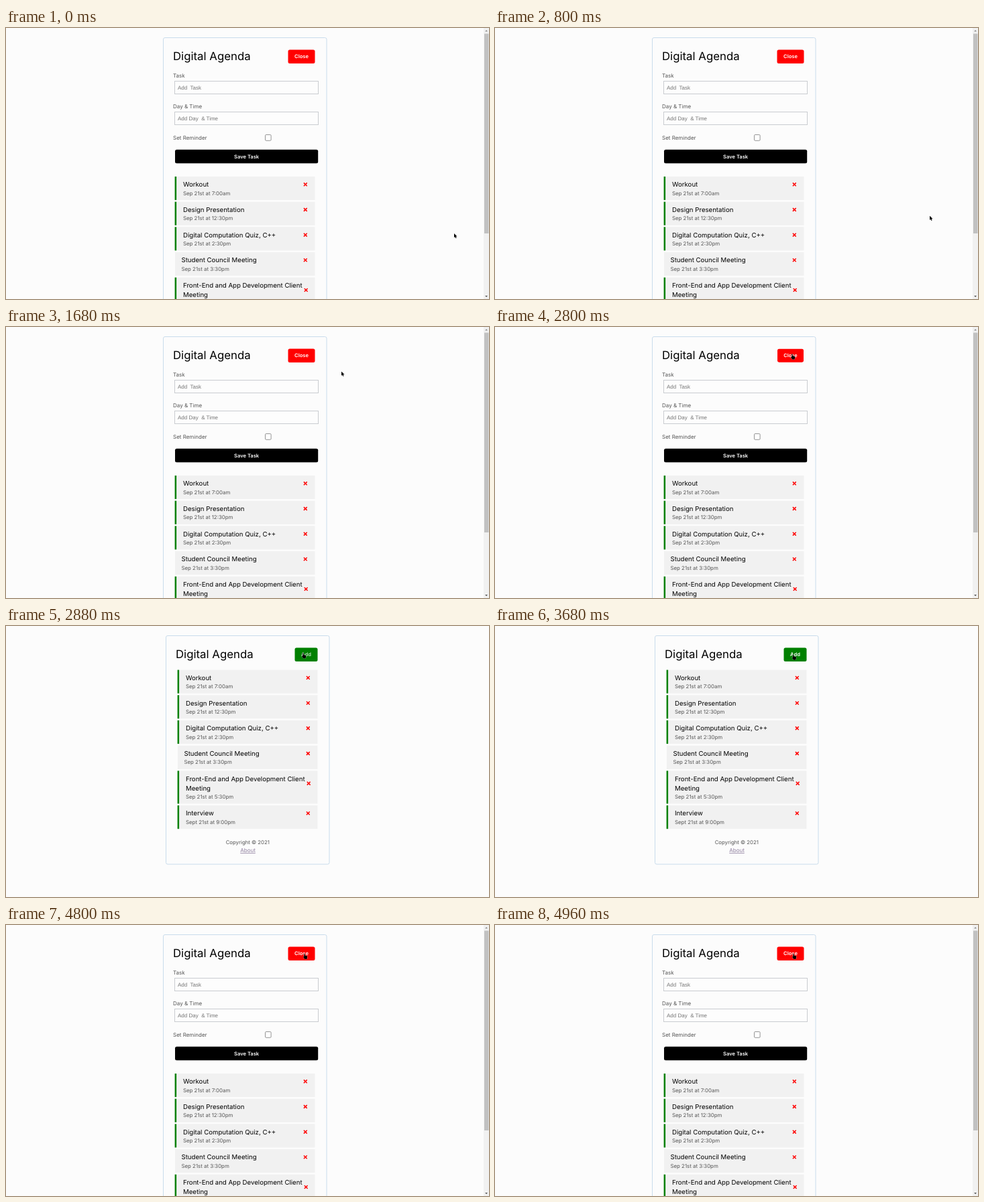
These frames come from a looping animation (720x405 px, 5680 ms). An HTML page:

```html
<!DOCTYPE html>
<html lang="en">
<head>
<meta charset="utf-8">
<style>
  html, body { margin: 0; width: 100%; height: 100%; overflow: hidden; background: #fcfcfc; }
  svg { display: block; width: 720px; height: 405px; }
  text { font: 8px Inter, sans-serif; fill: #555; text-rendering: geometricPrecision; white-space: pre; }
  .title { font-size: 16.8px; fill: #000; }
  .task { font-size: 9.65px; fill: #000; }
  .when { font-size: 7.85px; }
  .hint { font-family: "Liberation Sans", Arial, sans-serif; fill: #757575; }
  .label { font-size: 7.6px; font-weight: 600; fill: #fff; }
  .mid { text-anchor: middle; }
  .foot { font-size: 7.8px; }
  .link { fill: #8f7f9f; text-decoration: underline; }
  .card { fill: none; stroke: #c9dcec; }
  .field { fill: #fdfdfd; stroke: #c9ccd0; }
</style>
</head>
<body>
<svg viewBox="0 0 720 405">
  <g id="form"></g>
  <g id="list"></g>
  <path id="arrow" d="M0 0V6.2L1.4 5L2.4 7.2L3.5 6.7L2.6 4.6H4.5Z" stroke="#fff" stroke-width=".5" paint-order="stroke"/>
  <path id="hand" d="M1.3 .6Q2 -.3 2.6 .6V3L5.6 3.7Q6.4 4 6.2 5L5.6 8.4H2.2L.2 5.4Q0 4.4 1.3 4.8Z" stroke="#fff" stroke-width=".5" paint-order="stroke"/>
</svg>
<script>
const LOOP = 5680, STEP = 40;
const $ = id => document.getElementById(id);

const text = (x, y, cls, str) => `<text x="${x}" y="${y}" class="${cls}">${str}</text>`;
const rect = (x, y, w, h, attrs) => `<rect x="${x}" y="${y}" width="${w}" height="${h}" ${attrs}/>`;
const button = (id, x, y, w, h, fill, str) =>
  `<g id="${id}">${rect(x, y, w, h, `rx="2.5" fill="${fill}"`)}${text(x + w / 2, y + h / 2 + 2.7, 'label mid', str)}</g>`;

const tasks = [
  [['Workout'], 'Sep 21st at 7:00am', true],
  [['Design Presentation'], 'Sep 21st at 12:30pm', true],
  [['Digital Computation Quiz, C++'], 'Sep 21st at 2:30pm', true],
  [['Student Council Meeting'], 'Sep 21st at 3:30pm', false],
  [['Front-End and App Development Client', 'Meeting'], 'Sep 21st at 5:30pm', true],
  [['Interview'], 'Sept 21st at 9:00pm', true],
];

function taskList(x, y) {
  return tasks.map(([lines, when, reminder]) => {
    const extra = (lines.length - 1) * 14, h = 35.1 + extra;
    const tx = x + (reminder ? 12 : 9.5), cx = x + 194.3 + extra / 16, cy = y + 11.8 + extra / 2;
    const item = rect(x, y, 208.5, h, 'fill="#f1f1f1"')
      + (reminder ? rect(x - .4, y, 2.5, h, 'fill="green"') : '')
      + lines.map((line, i) => text(tx, y + 15.2 + 14 * i, 'task', line)).join('')
      + text(tx, y + 27.5 + extra, 'when', when)
      + `<path d="M${cx - 2.4} ${cy - 2.4}l4.8 4.8m0-4.8l-4.8 4.8" stroke="red" stroke-width="1.5"/>`;
    y += h + 2.6;
    return item;
  }).join('');
}

$('form').innerHTML =
  rect(234.5, 14.5, 243.5, 420, 'rx="2.5" class="card"')
  + text(249, 48.3, 'title', 'Digital Agenda')
  + button('close', 420.5, 32.5, 40, 20.5, 'red', 'Close')
  + text(249, 74, '', 'Task') + rect(251.5, 79.5, 214, 19, 'class="field"')
  + text(256, 92, 'hint', 'Add  Task')
  + text(249, 120, '', 'Day &amp; Time') + rect(251.5, 125.5, 214, 19, 'class="field"')
  + text(256, 137.6, 'hint', 'Add Day  &amp; Time')
  + text(249, 167, '', 'Set Reminder')
  + rect(386.5, 159.5, 8.6, 8.8, 'rx="1.3" fill="#fff" stroke="#8a8a8a" stroke-width=".9"')
  + button('save', 252, 181.7, 213.2, 20.5, '#000', 'Save Task')
  + taskList(252, 222)
  + rect(712, 0, 8, 405, 'fill="#f1f1f1"') + rect(713, 8.5, 6.5, 298.5, 'fill="#c1c1c1"')
  + '<path d="M714.2 5.2h3.8l-1.9-2.2z" fill="#888"/><path d="M714.2 400h3.8l-1.9 2.2z" fill="#555"/>';

$('list').innerHTML =
  rect(238.5, 14.5, 243.5, 341.5, 'rx="2.5" class="card"')
  + text(253, 48.3, 'title', 'Digital Agenda')
  + button('add', 430.5, 32.5, 34, 20.5, 'green', 'Add')
  + taskList(256, 65.6)
  + text(360.3, 326.3, 'mid foot', 'Copyright © 2021')
  + text(360.5, 338, 'mid link', 'About');

// Pointer tip: time, x, y
const path = [
  [680, 668, 307], [1200, 581.5, 193.3], [1280, 565, 163.5], [1680, 500, 66.5],
  [1880, 456.5, 43.5], [1920, 447, 41], [2000, 441, 40], [3400, 441, 40], [3720, 443, 42.6],
];

function pointerAt(t) {
  const i = path.findIndex(p => p[0] > t);
  if (i === 0) return path[0].slice(1);
  if (i < 0) return path[path.length - 1].slice(1);
  const [t0, x0, y0] = path[i - 1], [t1, x1, y1] = path[i], k = (t - t0) / (t1 - t0);
  return [x0 + (x1 - x0) * k, y0 + (y1 - y0) * k];
}

const show = (id, on) => $(id).setAttribute('visibility', on ? 'visible' : 'hidden');
const press = (id, x, y, on) =>
  $(id).setAttribute('transform', on ? `translate(${x} ${y}) scale(.975) translate(${-x} ${-y})` : '');

function draw(now) {
  const t = Math.floor(now % LOOP / STEP) * STEP;
  const listOpen = t >= 2880 && t < 4800, hovering = t >= 1920;
  show('form', !listOpen);
  show('list', listOpen);
  press('close', 440.5, 42.7, t >= 2720 && t < 2880);
  press('add', 447.5, 42.7, t >= 4720 && t < 4800);
  $('add').lastChild.setAttribute('opacity', t < 3080 ? .75 : 1);

  show('arrow', !hovering);
  show('hand', hovering);
  $(hovering ? 'hand' : 'arrow').setAttribute('transform', `translate(${pointerAt(t)})`);
  requestAnimationFrame(() => draw(performance.now() - start));
}

const start = performance.now();
draw(0);
</script>
</body>
</html>
```
